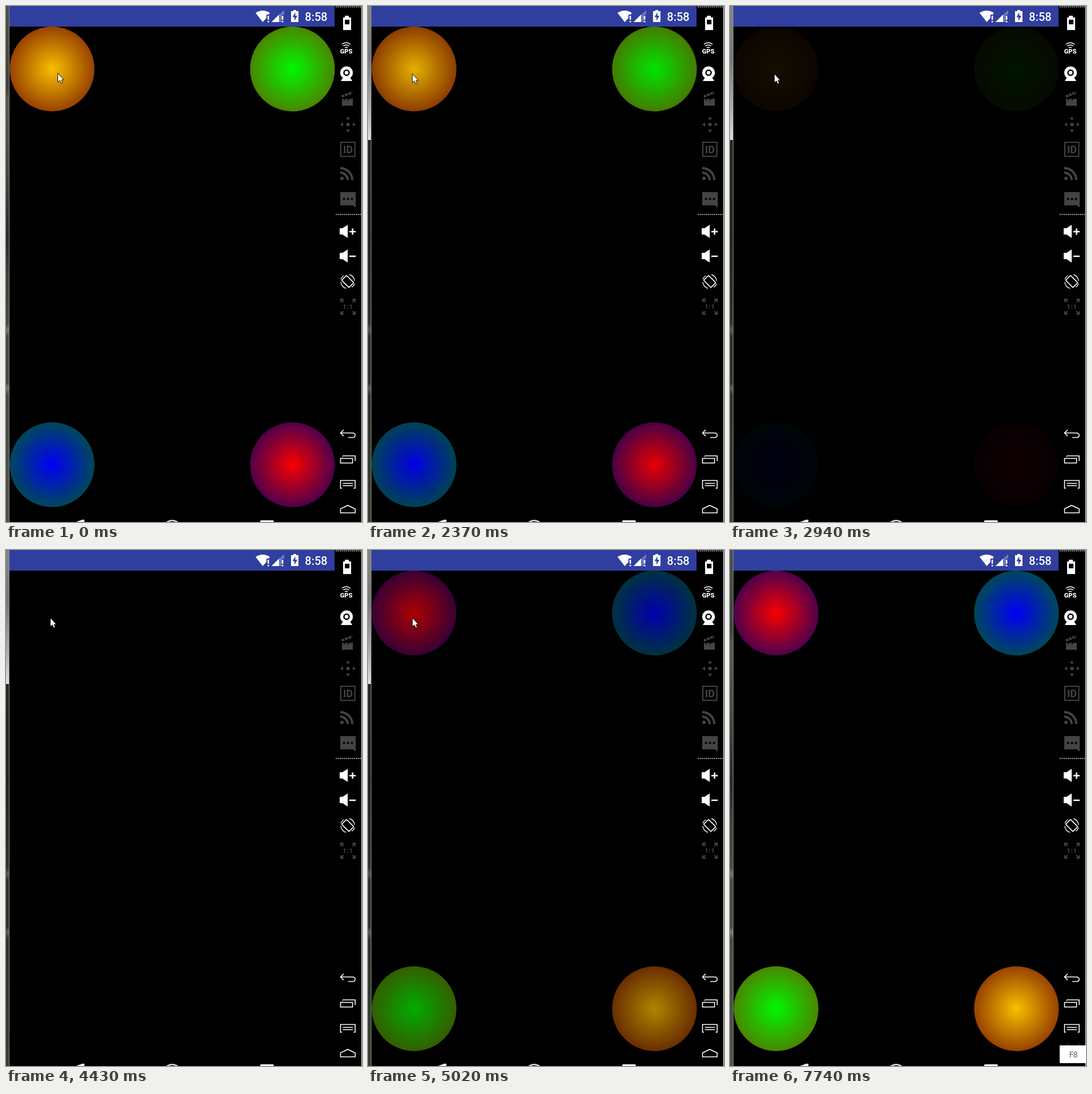
An HTML page that plays this animation: 622 px wide and 901 px high, repeating every 7990 ms.

```html
<!DOCTYPE html>
<html lang="en">
<head>
<meta charset="utf-8">
<title>Swapping balls</title>
<style>
  html, body { margin: 0; width: 100%; height: 100%; overflow: hidden; background: #000; }
  svg { display: block; }
  text { text-anchor: middle; font-family: Roboto, sans-serif; }
  .line { fill: none; stroke: #fff; stroke-width: 1.6; }
  .off { fill: #444; }
  .offLine { fill: none; stroke: #444; stroke-width: 2; }
</style>
</head>
<body>
<svg width="622" height="901" viewBox="0 0 622 901">
  <defs>
    <radialGradient id="orange"><stop stop-color="#f8c000"/><stop offset="1" stop-color="#984200"/></radialGradient>
    <radialGradient id="green"><stop stop-color="#00f800"/><stop offset="1" stop-color="#4a8600"/></radialGradient>
    <radialGradient id="blue"><stop stop-color="#0000f8"/><stop offset="1" stop-color="#00485a"/></radialGradient>
    <radialGradient id="red"><stop stop-color="#f80000"/><stop offset="1" stop-color="#50004c"/></radialGradient>
    <linearGradient id="blurred" x2="0" y2="1">
      <stop stop-color="#4c5149"/><stop offset=".16" stop-color="#3c413a"/><stop offset=".18" stop-color="#555a52"/>
      <stop offset=".3" stop-color="#474c45"/><stop offset=".45" stop-color="#252c2d"/><stop offset=".52" stop-color="#3b413a"/>
      <stop offset=".615" stop-color="#454b42"/><stop offset=".628" stop-color="#747a70"/><stop offset=".64" stop-color="#454b42"/>
      <stop offset=".73" stop-color="#454b42"/><stop offset=".74" stop-color="#777d73"/><stop offset=".755" stop-color="#454b42"/>
      <stop offset="1" stop-color="#4d5447"/>
    </linearGradient>
    <linearGradient id="forest" x2="0" y2="1">
      <stop stop-color="#858585"/><stop offset=".1" stop-color="#777"/><stop offset=".2" stop-color="#b0b0b0"/>
      <stop offset=".26" stop-color="#ddd"/><stop offset=".26" stop-color="#222c22"/><stop offset=".45" stop-color="#1d271d"/>
      <stop offset=".615" stop-color="#2b352a"/><stop offset=".628" stop-color="#565e53"/><stop offset=".64" stop-color="#2b352a"/>
      <stop offset=".73" stop-color="#2b352a"/><stop offset=".74" stop-color="#596156"/><stop offset=".755" stop-color="#2b352a"/>
      <stop offset="1" stop-color="#354030"/>
    </linearGradient>
    <clipPath id="firstBall"><circle cx="80.5" cy="110" r="74"/></clipPath>
    <path id="speaker" d="M583 -6h5l9-6v23l-9-6h-5z"/>
  </defs>

  <rect width="622" height="901"/>
  <rect id="strip" width="5" height="901"/>
  <path d="M5.5 0v901" stroke="#8a8a8a"/>
  <path d="M621.5 0v901" stroke="#fff"/>

  <!-- status bar -->
  <g fill="#fff">
    <rect x="6" width="568" height="36" fill="#303f9f"/>
    <path d="M436 12Q448.500 4 461 12L459 15H455V21L448.500 28Z"/>
    <path d="M457 17h2.500v7h-2.500zm0 9h2.500v2.500h-2.500z"/>
    <path d="M464 28L486 7V15H482V28Z" fill-opacity=".3"/>
    <path d="M464 28L477 15V28Z"/>
    <path d="M482 17h2.500v7h-2.500zm0 9h2.500v2.500h-2.500z"/>
    <path d="M498 9h4v-2h5v2h4v19h-13z"/>
    <path d="M505.500 11v6h3.500l-5 9v-6.500h-3.500z" fill="#303f9f"/>
    <text x="542" y="25.500" font-size="20" font-weight="500">8:58</text>
  </g>

  <g id="balls">
    <circle cx="80.500" cy="110" r="74"/>
    <circle cx="500.500" cy="110" r="74"/>
    <circle cx="80.500" cy="801" r="74"/>
    <circle cx="500.500" cy="801" r="74"/>
  </g>
  <g clip-path="url(#firstBall)"><circle id="ripple" fill="#ff0"/></g>

  <!-- navigation bar -->
  <g fill="#eee">
    <path d="M122 901L133 897h4v4z"/>
    <path d="M280 901q10-7.500 21 0h-4q-6.500-3-13 0z"/>
    <path d="M444 901v-1q0-2 2-2h20q2 0 2 2v1z"/>
  </g>

  <!-- side toolbar -->
  <path d="M576 1.500H620M576 364H620" stroke="#ddd" stroke-width="1.500" stroke-dasharray="2 1.500"/>
  <g fill="#fff">
    <path d="M592 17h7v3h4v22h-14v-22h3zM592 24v8h8v-8z" fill-rule="evenodd"/>
    <text x="594.500" y="83" font-size="11" font-weight="900">GPS</text>
    <path class="line" d="M587 67q7.500-6 15 0M589.500 70q5-4 10 0M592 73q2.500-2 5 0"/>
    <circle cx="595" cy="116.500" r="11"/>
    <circle cx="595" cy="116.500" r="4.500" fill="none" stroke="#000" stroke-width="2.500"/>
    <path d="M588 126l-3 5h20l-3-5z"/>
    <use href="#speaker" y="394"/><use href="#speaker" y="437"/>
    <path d="M600 394h11M605.500 388.500v11M600 437h11" stroke="#fff" stroke-width="2.500"/>
  </g>
  <g class="off">
    <path d="M587 162h19v12h-19zM586 156l18-7 1.500 4-18 7z"/>
    <path d="M590 154l3 4M596 152l3 4M602 150l2 3M590 165l3-4M597 165l3-4" stroke="#000" stroke-width="1.500"/>
    <circle cx="597.500" cy="207" r="3"/>
    <path d="M597.500 193l3.500 5h-7zM597.500 221l3.500-5h-7zM584 207l5-3.500v7zM611 207l-5-3.500v7z"/>
    <rect class="offLine" x="585" y="238" width="24.500" height="24.500"/>
    <text x="597.500" y="257" font-size="18" font-weight="700">ID</text>
    <circle cx="587" cy="301" r="3"/>
    <path class="offLine" stroke-width="4" style="stroke-width:4" d="M584 291a13 13 0 0 1 13 13M584 283a21 21 0 0 1 21 21"/>
    <path d="M584 325h27v27l-5-4h-22z"/>
    <g fill="#000"><circle cx="590.500" cy="337" r="2"/><circle cx="597.500" cy="337" r="2"/><circle cx="604.500" cy="337" r="2"/></g>
    <text x="597.500" y="529" font-size="11" font-weight="700" letter-spacing="1">1:1</text>
    <path class="offLine" d="M585 517v-5h5M585 512l5 5M610 517v-5h-5M610 512l-5 5M585 533v5h5M585 538l5-5M610 533v5h-5M610 538l-5-5"/>
  </g>
  <g class="line">
    <rect x="591" y="472" width="12" height="18" rx="1" transform="rotate(-45 597 481)"/>
    <path d="M585 482a12 12 0 0 0 9 11M609 480a12 12 0 0 0-9-11M585 477a12 12 0 0 1 5-6M609 485a12 12 0 0 1-5 6" stroke-width="1.300"/>
    <path d="M590 740l-5.500 5.500 5.500 5.500M585 745.500h20q5 0 5 4t-5 4h-7"/>
    <path d="M584.500 790h21v8h-21zM588 788v-1h0M588 785.500h22v9"/>
    <path d="M587 842h-2.500v-13.500h25.500v13.500h-2.500M588.500 833.500h17.500M588.500 837.500h17.500"/>
    <path d="M584.500 885v-7l12.500-6 13 6v7z"/>
  </g>

  <g id="tooltip">
    <path d="M590 861v4M610 861v4" stroke="#222" stroke-width="3"/>
    <rect x="576" y="865" width="46" height="31" fill="#fff"/>
    <text x="600" y="886" font-size="14" fill="#555" style="font-family:'Open Sans',sans-serif">F8</text>
  </g>
  <path id="cursor" d="M.5 .5V16L4 12.800 6.500 18 9 17 6.800 12H11Z" fill="#fff" stroke="#000" stroke-width=".9"/>
</svg>
<script>
const LOOP = 7990;
// Bursts of picture changes: first time, last time, count.
const bursts = [[0, 0, 1], [640, 960, 5], [1590, 1590, 1], [1900, 2620, 10], [2700, 3020, 5],
  [3170, 3170, 1], [4430, 4860, 6], [5020, 5430, 6], [5750, 6360, 9], [6460, 6460, 1],
  [6550, 6730, 4], [7070, 7130, 2], [7610, 7740, 3]];
// Pointer path: time, x, y.
const pointer = [[560, 90, 117], [960, 77, 118], [5670, 77, 118], [5826, 61, 172], [5902, 65, 200],
  [5979, 74, 228], [6131, 205, 385], [6284, 365, 585], [6360, 425, 660], [6460, 446, 695],
  [6670, 478, 759], [7070, 520, 861], [7130, 558, 884]];

const el = id => document.getElementById(id);
const balls = [...el('balls').children];
const progress = (t, start, end) => Math.min(1, Math.max(0, (t - start) / (end - start)));
const mix = (a, b, p) => a + (b - a) * p;
const ease = p => (1 - Math.cos(p * Math.PI)) / 2;

function set(id, attributes) {
  for (const name in attributes) el(id).setAttribute(name, attributes[name]);
}

function snap(t) {
  const [start, end, count] = bursts.findLast(burst => burst[0] <= t);
  if (count === 1) return start;
  const step = (end - start) / (count - 1);
  return start + step * Math.min(count - 1, Math.floor((t - start) / step + 1e-6));
}

function pointerAt(t) {
  const next = pointer.findIndex(key => key[0] > t);
  if (next === 0) return pointer[0].slice(1);
  if (next < 0) return pointer.at(-1).slice(1);
  const [a, b] = [pointer[next - 1], pointer[next]];
  const p = progress(t, a[0], b[0]);
  return [mix(a[1], b[1], p), mix(a[2], b[2], p)];
}

function draw(time) {
  const t = snap(time);
  const swapped = t > 3100;
  const colors = swapped ? ['red', 'blue', 'green', 'orange'] : ['orange', 'green', 'blue', 'red'];
  balls.forEach((ball, i) => ball.setAttribute('fill', `url(#${colors[i]})`));
  set('balls', { opacity: swapped ? ease(progress(t, 4390, 5390)) : 1 - ease(progress(t, 2120, 3120)) });

  const spread = progress(t, 1820, 2220);
  set('ripple', {
    cx: mix(85, 80.5, spread), cy: mix(126, 110, spread), r: mix(27, 90, spread),
    opacity: t < 1590 ? 0 : 0.55 * (1 - spread)
  });

  set('strip', { fill: t < 1590 || t >= 7610 ? 'url(#blurred)' : 'url(#forest)' });
  set('tooltip', { opacity: t < 7610 ? 0 : mix(0.3, 1, progress(t, 7610, 7740)) });

  const hidden = t >= 6730 && t < 7070 || t >= 7610;
  set('cursor', {
    transform: `translate(${pointerAt(t).map(Math.round)})`,
    visibility: hidden ? 'hidden' : 'visible'
  });
}

const begin = performance.now();
function frame() {
  draw((performance.now() - begin) % LOOP);
  requestAnimationFrame(frame);
}
frame();
</script>
</body>
</html>
```
